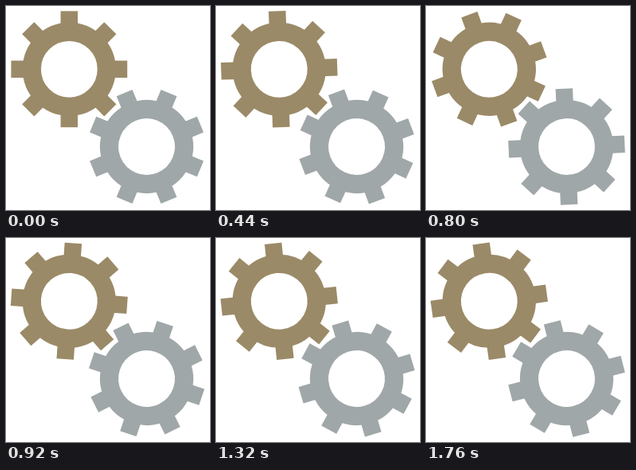
Write an HTML page that moves like this. It is 256 by 256 pixels and loops after 1.8 s.

```html
<!DOCTYPE html>
<html lang="en">
<head>
<meta charset="utf-8">
<title>Turning gears</title>
<style>
  html, body { margin: 0; width: 100%; height: 100%; overflow: hidden; background: #fff; }
  svg { display: block; width: 100%; height: 100%; }
</style>
</head>
<body>
<svg viewBox="0 0 256 256"></svg>
<script>
const NS = "http://www.w3.org/2000/svg";
const LOOP = 1800, STEP = 40, STEPS = LOOP / STEP;
const TEETH = 8, TIP = 72.9, TOOTH = 21.5, RIM = 58.5, HOLE = 35.4;

const gears = [
  { x: 79.3, y: 79.3, color: "#9b8a68", start: 0, dir: 1 },
  { x: 176.5, y: 176.5, color: "#a0a7a8", start: 22.5, dir: -1 },
];

function add(parent, tag, attrs) {
  const el = document.createElementNS(NS, tag);
  for (const key in attrs) el.setAttribute(key, attrs[key]);
  return parent.appendChild(el);
}

const svg = document.querySelector("svg");
for (const gear of gears) {
  gear.el = add(svg, "g", { fill: gear.color });
  for (let i = 0; i < TEETH; i++) {
    add(gear.el, "rect", {
      x: -TOOTH / 2, y: -TIP, width: TOOTH, height: TIP - (RIM + HOLE) / 2,
      transform: `rotate(${i * 360 / TEETH})`,
    });
  }
  add(gear.el, "circle", {
    r: (RIM + HOLE) / 2, fill: "none",
    stroke: gear.color, "stroke-width": RIM - HOLE,
  });
}

// One full turn per loop, in hard 8 degree steps.
function draw(time) {
  const turn = Math.floor((time % LOOP) / STEP) * 360 / STEPS;
  for (const { el, x, y, start, dir } of gears) {
    el.setAttribute("transform", `translate(${x} ${y}) rotate(${start + dir * turn})`);
  }
}

const begin = performance.now();
function tick() {
  draw(performance.now() - begin);
  requestAnimationFrame(tick);
}
draw(0);
requestAnimationFrame(tick);
</script>
</body>
</html>
```
